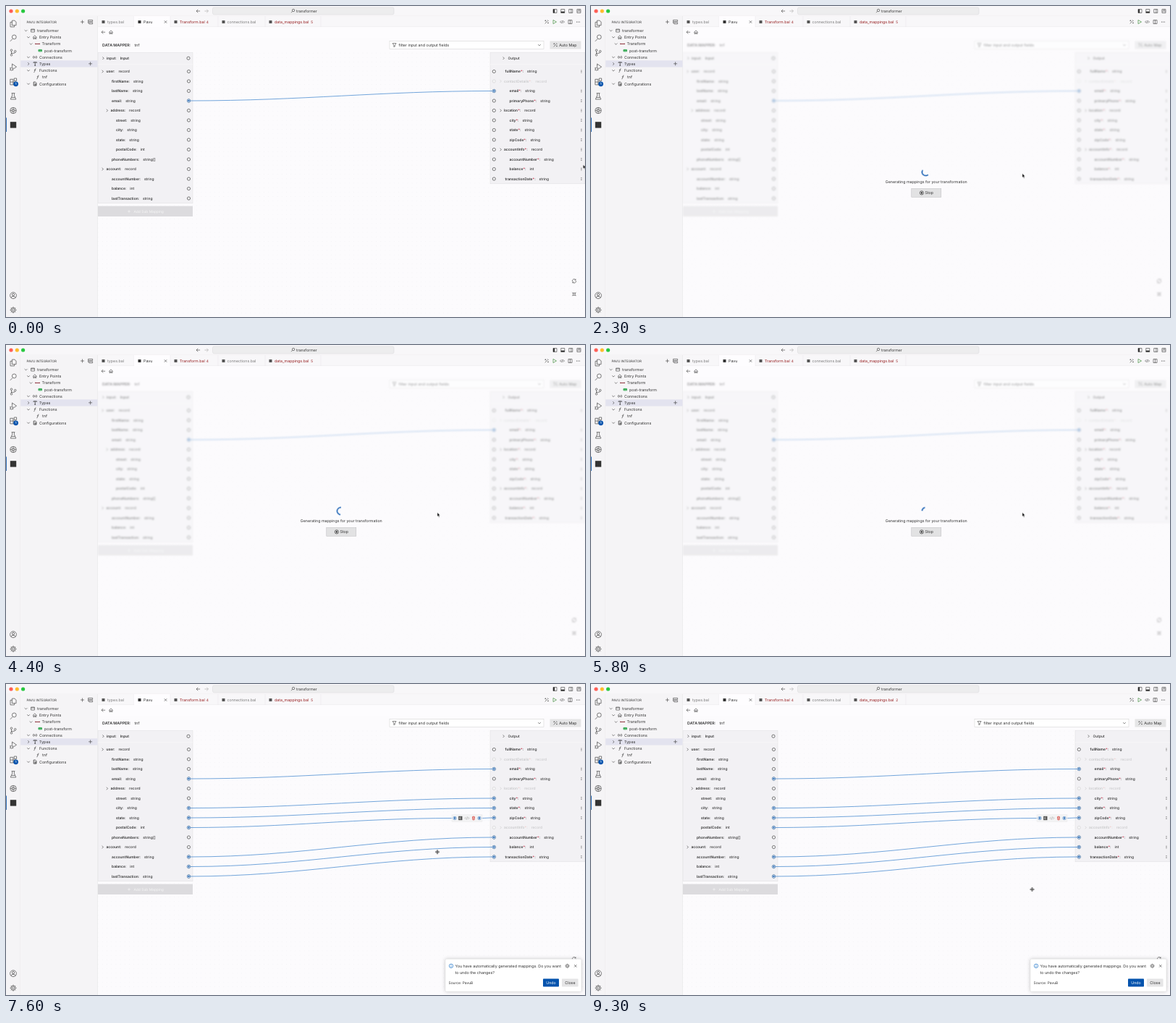
Animation of 800 by 430 pixels, one loop 9.4 s. Source, as an HTML page:

```html
<!DOCTYPE html>
<html lang="en">
<head>
<meta charset="utf-8">
<title>Data mapper</title>
<style>
html, body { margin: 0; width: 100%; height: 100%; overflow: hidden; background: #fff; }
svg { display: block; font-family: Inter, "Liberation Sans", sans-serif; text-rendering: geometricPrecision; }
text { white-space: pre; }
.veil, .busy, .pre, .post, .many, .few, .cursor, .toast, .ring { animation: 9400ms step-end infinite; }
.veil { animation-name: veil; }
.busy { animation-name: busy; }
.pre { animation-name: pre; }
.post { animation-name: post; }
.many { animation-name: many; }
.few { animation-name: few; }
.cursor { animation-name: cursor; animation-timing-function: ease-in-out; }
.toast { animation-name: toast; animation-timing-function: ease-out; }
.ring { animation-name: ring; animation-timing-function: linear; }
@keyframes veil { 0% { filter: none; opacity: 1; } 14.83% { filter: blur(1.1px); opacity: .5; } 68.09%, 100% { filter: none; opacity: 1; } }
@keyframes busy { 0% { visibility: hidden; } 14.83% { visibility: visible; } 68.09%, 100% { visibility: hidden; } }
@keyframes pre { 0% { visibility: visible; } 68.09%, 100% { visibility: hidden; } }
@keyframes post { 0% { visibility: hidden; } 68.09%, 100% { visibility: visible; } }
@keyframes many { 0% { visibility: visible; } 85.1%, 100% { visibility: hidden; } }
@keyframes few { 0% { visibility: hidden; } 85.1%, 100% { visibility: visible; } }
@keyframes cursor {
  0%, 1.06% { transform: translate(797.5px, 220px); }
  10.1%, 18.1% { transform: translate(773px, 54px); }
  23.9%, 83% { transform: translate(596px, 232.2px); }
  91.5%, 100% { transform: translate(609.5px, 284px); }
}
@keyframes toast {
  0%, 70.85% { transform: translateY(50px); opacity: 0; }
  74.04%, 100% { transform: none; opacity: 1; }
}
@keyframes ring {
  0%, 14.83% { transform: rotate(0deg); stroke-dasharray: 0 100; }
  25.47% { transform: rotate(450deg); stroke-dasharray: 50 50; }
  36.11% { transform: rotate(1080deg); stroke-dasharray: 0 100; }
  46.74% { transform: rotate(1530deg); stroke-dasharray: 50 50; }
  57.38% { transform: rotate(2160deg); stroke-dasharray: 0 100; }
  68.02% { transform: rotate(2610deg); stroke-dasharray: 50 50; }
  78.66%, 100% { transform: rotate(3240deg); stroke-dasharray: 0 100; }
}
</style>
</head>
<body>
<svg id="stage" width="800" height="430" viewBox="0 0 800 430"></svg>
<script>
const INK = '#333', BLUE = '#0553ad', LINK = '#4489cf', RED = '#971f20', EDGE = '#e3e2e5', PANEL = '#f5f4f6';

const rect = (x, y, w, h, fill, extra = '') =>
  `<rect x="${x}" y="${y}" width="${w}" height="${h}" fill="${fill}" ${extra}/>`;
const text = (x, y, s, size = 5.35, fill = INK, extra = '') =>
  `<text x="${x}" y="${y + size * .36}" font-size="${size}" fill="${fill}" ${extra}>${s}</text>`;
const icon = (x, y, d, color = '#444', width = .65, fill = 'none') =>
  `<path d="${d}" transform="translate(${x} ${y})" fill="${fill}" stroke="${color}" stroke-width="${width}"/>`;
const group = (cls, ...parts) => `<g class="${cls}">${parts.join('')}</g>`;
const dot = (x, y, r, fill, extra = '') => `<circle cx="${x}" cy="${y}" r="${r}" fill="${fill}" ${extra}/>`;
const ringOf = r => `M${-r} 0a${r} ${r} 0 1 0 ${2 * r} 0a${r} ${r} 0 1 0 ${-2 * r} 0z`;
const box = (w, h) => `M${-w / 2} ${-h / 2}h${w}v${h}h${-w}z`;

const RIGHT = 'M-.9-1.8L.9 0L-.9 1.8', DOWN = 'M-1.8-.9L0 .9L1.8-.9';
const PLUS = 'M-2.5 0H2.5M0-2.5V2.5', CROSS = 'M-1.7-1.7L1.7 1.7M1.7-1.7L-1.7 1.7';
const BACK = 'M2.6 0H-2.4M-.3-2.2L-2.5 0L-.3 2.2';
const HOME = 'M-2.7 .2L0-2.4L2.7 .2M-1.9-.4V2.3H-.7V.6H.7V2.3H1.9V-.4';
const WAND = 'M-2.3 2.3L1.4-1.4M-1.6-2.6V-.8M-2.5-1.7H-.7M2 .6V2.2M1.2 1.4H2.8M1.2-2.6L2.6-1.2';
const CODE = 'M-1.3-1.6L-2.9 0L-1.3 1.6M1.3-1.6L2.9 0L1.3 1.6M.6-2L-.6 2';
const GEAR = ringOf(1.1) + ringOf(2.2) + 'M0-3.1V-2.2M0 3.1V2.2M-3.1 0H-2.2M3.1 0H2.2M-2.1-2.1L-1.5-1.5M2.1 2.1L1.5 1.5M-2.1 2.1L-1.5 1.5M2.1-2.1L1.5-1.5';
const FN = 'M1.5-2.4Q.2-2.8 0-1L-.5 1.5Q-.7 2.7-1.6 2.4M-1.2-.5H1.2';

function titleBar() {
  const lights = ['#ff5f57', '#febc2e', '#28c840'].map((c, i) => dot(7 + i * 8.3, 7, 2.6, c));
  return rect(0, 0, 800, 14, '#f8f7f9') + lights.join('') +
    icon(265.5, 7, BACK) + icon(277, 7, 'M-2.6 0H2.4M.3-2.2L2.5 0L.3 2.2', '#aaa') +
    rect(285.5, 2, 250.5, 9.8, '#ededee', 'rx="2" stroke="#d6d6d8" stroke-width=".5"') +
    icon(396.5, 6.8, 'M-.8 .6L-2.4 2.4' + 'M-1.1-.8a1.7 1.7 0 1 0 3.4 0a1.7 1.7 0 1 0-3.4 0z') +
    text(401, 6.9, 'transformer', 5.2) +
    icon(758.5, 7, box(5, 5)) + rect(756, 4.5, 2.2, 5, INK) +
    icon(769.3, 7, box(5, 5)) + rect(766.8, 7.6, 5, 1.9, INK) +
    icon(780.3, 7, box(5, 5) + 'M.5-2.5V2.5') +
    icon(791.5, 7, box(5, 5) + 'M-2.5 0H2.5M.3-2.5V0');
}

function activityBar() {
  const g = '#5c5c5c', w = .8;
  return rect(0, 14, 20, 416, PANEL) + rect(19.7, 14, .5, 416, EDGE) +
    icon(10, 24.5, 'M-1.6-4.4H2L4 -2.4V2.2H-1.6zM-1.6-2.2H-4V4.4H1.6V2.2', g, w) +
    icon(10, 44.3, 'M-1 1.2L-4.2 4.5M-1.6-1.4a2.9 2.9 0 1 0 5.8 0a2.9 2.9 0 1 0-5.8 0z', g, w) +
    icon(10, 64.3, 'M-2.5-1.8V2.2M-2.5 1Q2.6 1.4 2.7-.3M-3.8-3.1a1.3 1.3 0 1 0 2.6 0a1.3 1.3 0 1 0-2.6 0zM-3.8 3.4a1.3 1.3 0 1 0 2.6 0a1.3 1.3 0 1 0-2.6 0zM1.4-1.6a1.3 1.3 0 1 0 2.6 0a1.3 1.3 0 1 0-2.6 0z', g, w) +
    icon(10, 84.5, 'M-1.5-.2V-4.5L4.5-.3L.2 2.6M-4 2.6a1.7 2 0 1 0 3.4 0a1.7 2 0 1 0-3.4 0zM-4.8 1L-3.6 1.8M.2 1L-1 1.8M-4.8 4.4L-3.6 3.6M.2 4.4L-1 3.6', g, w) +
    icon(10, 104.5, 'M-4.2-3.2H-.2V4.4H-4.2zM-4.2 .6H3.8V4.4H-.2M1.2-4.5H4.6V-1.1H1.2z', g, w) +
    dot(13.6, 107.8, 3.4, BLUE) + text(13.6, 107.8, '1', 4.2, '#fff', 'text-anchor="middle" font-weight="600"') +
    icon(10, 124.8, 'M-2.4-4.2H2.4M-1.4-4.2V-1L-3.8 4.2H3.8L1.4-1V-4.2M-2.6 1.6H2.6', g, w) +
    icon(10, 144.5, ringOf(4.1) + ringOf(1.4) + 'M0-4.1V-1.4M0 4.1V1.4M-4.1 0H-1.4M4.1 0H1.4M-2.9-2.9L-1-1M2.9 2.9L1 1M-2.9 2.9L-1 1M2.9-2.9L1-1', g, w) +
    rect(0, 154.5, .8, 19.5, BLUE) + rect(5.8, 160.2, 8.4, 8.4, INK) +
    icon(10, 400.3, ringOf(4.4) + 'M-1.6-1.2a1.6 1.6 0 1 0 3.2 0a1.6 1.6 0 1 0-3.2 0zM-3 3.2Q-2.4 1 0 1T3 3.2', g, w) +
    `<g transform="translate(10 420.3) scale(1.45)">${icon(0, 0, GEAR, g, .55)}</g>`;
}

function sideBar() {
  const rows = [
    [43, 'transformer', 27.5, DOWN, 37, 'M-2.4-2H2.4V2H-2.4zM-2.4-1H2.4'],
    [46, 'Entry Points', 31, DOWN, 39.8, HOME],
    [49.5, 'Transform', 34.5, DOWN, 43.5, 'M-2.8 0H2.8M-2.8-.7V.7M2.8-.7V.7', '#8c2f39', 1],
    [53, 'post-transform', 0, '', 47, 'M-2 0H2.4M-2-1.2H2.4V1.2H-2z', '#2fa84f', 1],
    [46, 'Connections', 31, DOWN, 40, 'M0 0Q-2.6-3-2.6 0T0 0Q2.6-3 2.6 0T0 0'],
    [46, 'Types', 31, RIGHT, 40.2, 'M-2.2-1.2V-2.2H2.2V-1.2M0-2.2V2.3M-.9 2.3H.9', '#333', .8],
    [46, 'Functions', 31, DOWN, 40, FN],
    [50, 'tnf', 0, '', 44, FN],
    [46, 'Configurations', 31, DOWN, 40, 'M-1.8-2.5H.6L1.9-1.2V2.5H-1.8zM-.6 .3H1.9M-.6 1.4H1.9', '#333', .8]
  ];
  const tree = rows.map(([x, s, cx, chev, ix, d, c, w], i) => {
    const y = 34 + i * 9.2;
    return (cx ? icon(cx, y, chev) : '') + icon(ix, y, d, c, w) + text(x, y, s);
  });
  return rect(20.2, 14, 106.5, 416, PANEL) + rect(126.4, 14, .5, 416, EDGE) +
    text(28.5, 22, 'PAVU INTEGRATOR', 4.5) + icon(105.5, 22, PLUS) +
    icon(116.6, 22, 'M-3-2.6H3V-.6H-3zM-1.8 .8H3V2.8H-1.8zM-3-.6V2') +
    rect(20.2, 75.3, 106.3, 9.2, '#e3e3ef') + tree.join('') + icon(116.6, 79.8, PLUS);
}

function tabs() {
  const list = [
    [127, 50, 'types.bal', 140, '#7a7a7a'],
    [177, 50, 'Pavu', 190, INK],
    [227, 66, 'Transform.bal', 240, RED],
    [293, 65, 'connections.bal', 305.5, '#7a7a7a'],
    [358, 77, 'data_mappings.bal', 371, RED]
  ];
  const items = list.map(([x, w, s, tx, c], i) =>
    (i === 1 ? rect(x, 14, w, 15.3, '#fefdff') : '') +
    rect(x + w - .2, 14, .4, 15, EDGE) + rect(x + 5.5, 20, 4, 4, i === 1 ? '#333' : '#555') + text(tx, 22, s, 5.3, c));
  return rect(127, 14, 673, 15, '#f8f7f9') + rect(127, 28.7, 673, .4, EDGE) + items.join('') +
    icon(220.5, 22, CROSS) + text(276.8, 22, '4', 4.8, RED) +
    group('many', text(421.3, 22, '5', 4.8, RED)) + group('few', text(421.3, 22, '2', 4.8, RED)) +
    icon(747, 22, WAND) + icon(758, 22, 'M-2-2.6L2.5 0L-2 2.6z', '#388a34') + icon(768.5, 22, CODE) +
    icon(779.5, 22, box(5, 5) + 'M0-2.5V2.5') +
    [-2, 0, 2].map(d => dot(790.5 + d, 22, .6, '#444')).join('') +
    rect(127, 29.1, 673, 14.9, '#fdfcfe') + icon(134.5, 36.2, BACK) + icon(145, 36.2, HOME);
}

const rowY = i => 90.5 + i * 13.5;
const label = (x, y, name, type, req, faded) => {
  const c = faded ? '#c9c9cb' : INK;
  const star = req ? `<tspan fill="${faded ? '#ecc' : '#c4314b'}">*</tspan>` : '';
  return text(x, y, `<tspan font-weight="600">${name}${star}:</tspan><tspan dx="4.8">${type}</tspan>`, 4.95, c, 'font-weight="500"');
};
const port = (x, y, color = '#444') => dot(x, y, 2.1, '#f5f5f6', `stroke="${color}" stroke-width=".7"`);
const linked = (x, y) => dot(x, y, 2.2, '#fff', 'stroke="#2a6fb8" stroke-width=".6"') + dot(x, y, 1.15, '#1a5fae');

const inputs = [
  [138.5, 'user', 'record', 133.5], [146, 'firstName', 'string'], [146, 'lastName', 'string'], [146, 'email', 'string'],
  [144.5, 'address', 'record', 139.7], [152, 'street', 'string'], [152, 'city', 'string'], [152, 'state', 'string'],
  [152, 'postalCode', 'int'], [146, 'phoneNumbers', 'string[]'], [138.5, 'account', 'record', 133.5],
  [146, 'accountNumber', 'string'], [146, 'balance', 'int'], [146, 'lastTransaction', 'string']
];
const outputs = [
  [689.5, 'fullName', 'string'], [688, 'contactDetails', 'record', 683.5], [695.5, 'email', 'string'],
  [695.5, 'primaryPhone', 'string'], [688, 'location', 'record', 683.5], [695.5, 'city', 'string'],
  [695.5, 'state', 'string'], [695.5, 'zipCode', 'string'], [688, 'accountInfo', 'record', 683.5],
  [695.5, 'accountNumber', 'string'], [695.5, 'balance', 'int'], [689.5, 'transactionDate', 'string']
];
const links = [[3, 2], [6, 5], [7, 6], [8, 7], [11, 9], [12, 10], [13, 11]];
const IN = 252.5, OUT = 674.3;

const curve = (x1, y1, x2, y2) => {
  const k = (x2 - x1) * .37;
  return `<path d="M${x1} ${y1}C${x1 + k} ${y1} ${x2 - k} ${y2} ${x2} ${y2}" fill="none" stroke="${LINK}" stroke-width=".75"/>`;
};

function outputRow([x, name, type, chev], i, faded) {
  const y = rowY(i), kebab = [-1.6, 0, 1.6].map(d => dot(795, y + d, .5, '#444')).join('');
  return port(OUT, y, faded ? '#d4d4d6' : '#444') + (chev ? icon(chev, y, RIGHT, faded ? '#ccc' : '#444') : '') +
    label(x, y, name, type, true, faded) + (faded ? '' : kebab);
}

function link([a, b]) {
  const y1 = rowY(a), y2 = rowY(b), ends = linked(IN, y1) + linked(OUT, y2);
  if (b !== 7) return curve(IN + 2, y1, OUT - 2, y2) + ends;
  const y = 185.5;
  return curve(IN + 2, y1, 618, y) + curve(656, y, OUT - 2, y2) + ends +
    rect(616, 180.8, 42, 9.4, '#f3f3f4', 'stroke="#e4e4e6" stroke-width=".4"') + linked(620, y) + linked(654, y) +
    rect(625.2, 182.8, 5.2, 5.4, '#4b4b4b') + icon(627.8, y, 'M1-1.4H-1V1.4H1M-1 0H.7', '#eee', .5) +
    icon(637, y, CODE, '#888', .5) + icon(646, y, 'M-2-1.6H2M-.7-2.3H.7M-1.4-1.6L-1.1 2.3H1.1L1.4-1.6M0-.7V1.5', '#d9433a', .8);
}

function mapper() {
  const node = (x, h) => rect(x, 64.2, 131, h, '#f2f1f4', 'stroke="#dedde0" stroke-width=".5"') + rect(x, 80.6, 131, .6, '#fafafb');
  const left = inputs.map(([x, name, type, chev], i) =>
    port(IN, rowY(i)) + (chev ? icon(chev, rowY(i), RIGHT) : '') + label(x, rowY(i), name, type));
  const right = outputs.map((r, i) => {
    if (i === 1) return outputRow(r, i, true);
    if (r[3]) return group('pre', outputRow(r, i, false)) + group('post', outputRow(r, i, true));
    return outputRow(r, i, false);
  });
  return text(133, 54, 'DATA MAPPER:', 5.35, INK, 'font-weight="600"') + text(177.5, 54, 'tnf') +
    rect(530, 48.5, 213, 11, '#fff', 'stroke="#cecece" stroke-width=".5"') +
    icon(536.6, 54, 'M-2.5-2.4H2.5L.7 .2V2L-.7 2.6V.2z') + text(542.5, 54, 'filter input and output fields') +
    icon(737, 54, DOWN) + rect(751.5, 48.5, 43, 11, '#e5e5e6') + icon(759, 54, WAND) + text(764.2, 54, 'Auto Map') +
    rect(127, 63.6, 673, 366.4, 'url(#dots)') +
    node(127, 208.6) + node(669, 181.6) +
    icon(134.3, 72.2, RIGHT) + port(252, 72.2) +
    text(139, 72.2, 'input:<tspan dx="5">Input</tspan>', 4.95, INK, 'font-weight="600"') +
    icon(687.5, 72.2, RIGHT) + text(693.5, 72.2, 'Output', 4.95, INK, 'font-weight="500"') +
    left.join('') + right.join('') + link(links[0]) + group('post', links.slice(1).map(link).join('')) +
    rect(127, 276.6, 131, 14.4, '#dcdbde') + icon(170, 284, 'M-1.8 0H1.8M0-1.8V1.8', '#f6f6f6') +
    text(176.5, 284, 'Add Sub Mapping', 4.9, '#f6f6f6') +
    icon(785, 380.3, 'M-2.5 .5A2.5 2.5 0 0 1 1.9-1.7M2.5-.5A2.5 2.5 0 0 1-1.9 1.7M2.1-2.9V-1.4H.6M-2.1 2.9V1.4H-.6') +
    icon(785, 398.4, 'M-2.6-2.6L-.8-.8V-2.2M-.8-.8H-2.2M2.6-2.6L.8-.8V-2.2M.8-.8H2.2M-2.6 2.6L-.8 .8V2.2M-.8 .8H-2.2M2.6 2.6L.8 .8V2.2M.8 .8H2.2');
}

const progress = () =>
  `<g transform="translate(462.5 229.6)"><circle class="ring" r="5" fill="none" stroke="${BLUE}" stroke-width="1.5" pathLength="100"/></g>` +
  text(463.3, 243.2, 'Generating mappings for your transformation', 5.3, INK, 'text-anchor="middle"') +
  rect(442.8, 252.6, 41, 11.6, '#e2e2e3', 'stroke="#b9b9bb" stroke-width=".5"') +
  icon(456.9, 258.4, ringOf(2.6), '#333', .7) + rect(455.8, 257.3, 2.2, 2.2, '#333') + text(461.5, 258.4, 'Stop');

const toast = () =>
  rect(607, 380.2, 188, 45, '#fff', 'rx="1.5" stroke="#dcdcde" stroke-width=".5" style="filter:drop-shadow(0 0 2.5px #0003)"') +
  icon(615, 389.8, ringOf(2.7) + 'M0-.4V1.6M0-1.5V-.9', '#1a73c7', .7) +
  text(620.5, 389.8, 'You have automatically generated mappings. Do you want') + text(620.5, 399, 'to undo the changes?') +
  icon(775.6, 389.8, GEAR, '#444', .55) + icon(786.8, 389.8, CROSS) +
  text(611.5, 413, 'Source: PavuB', 4.9) +
  rect(742, 407.6, 22, 11, BLUE, 'rx=".8"') + text(753, 413, 'Undo', 5.3, '#fff', 'text-anchor="middle"') +
  rect(768, 407.6, 22.6, 11, '#e5e5e6', 'rx=".8"') + text(779.4, 413, 'Close', 5.3, INK, 'text-anchor="middle"');

const pointer = () =>
  group('pre', icon(0, 0, 'M0-.6V4.8L1.2 3.7L2.1 5.8L3 5.4L2.1 3.4H3.8z', '#fff', .4, '#000')) +
  group('post', icon(0, 0, 'M-2.6 0H2.6M0-2.6V2.6', '#fff', 1.9) +
    icon(0, 0, 'M-2.4 0H2.4M0-2.4V2.4M-1.7-.7L-2.5 0L-1.7 .7M1.7-.7L2.5 0L1.7 .7M-.7-1.7L0-2.5L.7-1.7M-.7 1.7L0 2.5L.7 1.7', '#111', .8));

document.getElementById('stage').innerHTML =
  `<defs><pattern id="dots" width="6.2" height="6.2" patternUnits="userSpaceOnUse">${dot(3, 3, .35, '#e7e7eb')}</pattern></defs>` +
  rect(127, 44, 673, 386, '#fcfbfd') +
  group('veil', mapper()) + group('busy', progress()) +
  titleBar() + rect(0, 13.8, 800, .4, EDGE) + tabs() + activityBar() + sideBar() +
  group('toast', toast()) + group('cursor', pointer());
</script>
</body>
</html>
```
